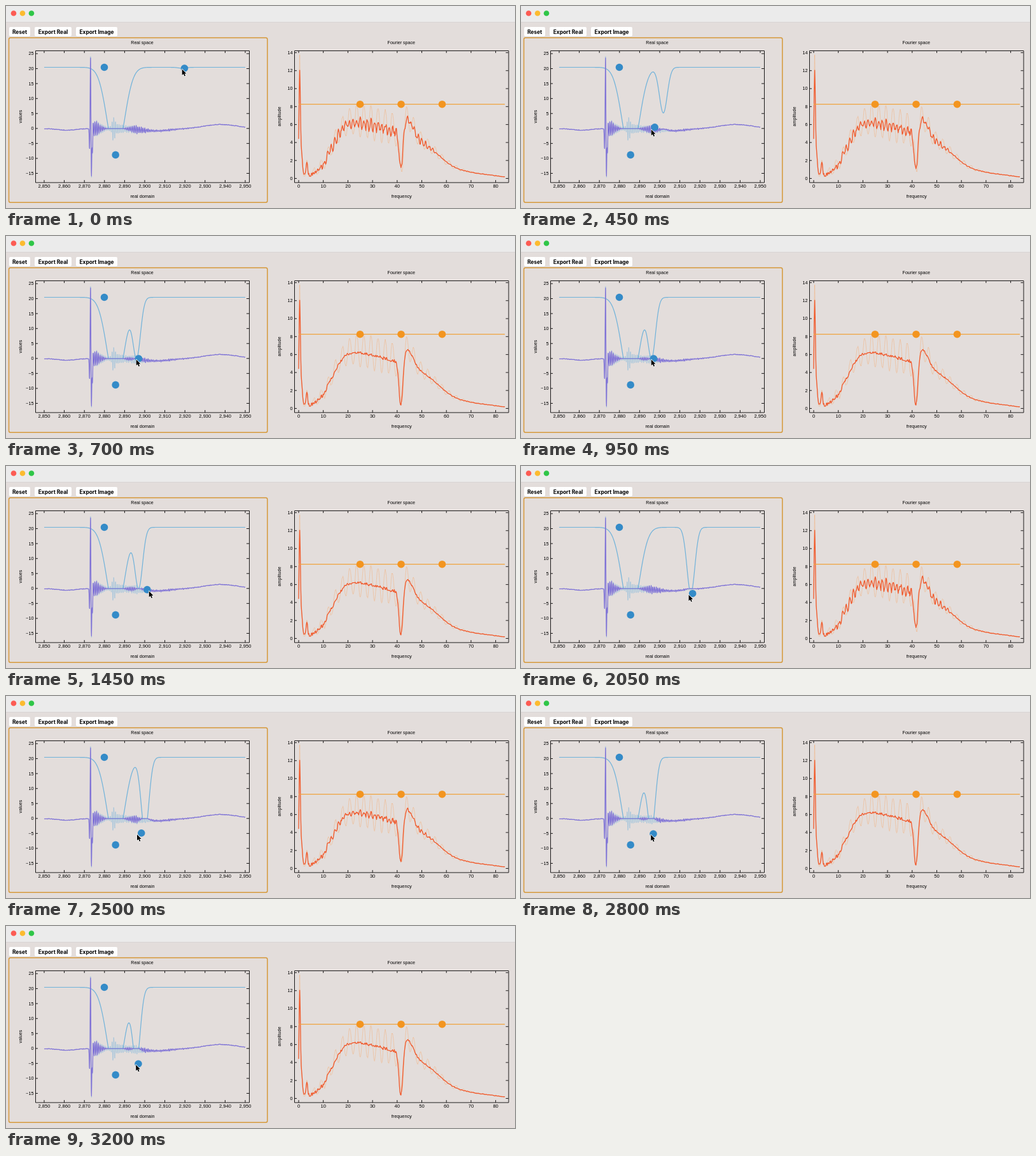
Recreate the animation shown at these times as an HTML page with a canvas. Size 800 px wide and 318 px high, loop 3.25 s.

```html
<!DOCTYPE html>
<html lang="en">
<head>
<meta charset="utf-8">
<title>Fourier filter</title>
<style>
html, body { margin: 0; width: 100%; height: 100%; overflow: hidden; background: #e3dddb; }
canvas { display: block; width: 800px; height: 318px; }
</style>
</head>
<body>
<canvas id="stage"></canvas>
<script>
const LOOP = 3250, STEP = 50;
const TOP = 96.5, ZERO = 193, SPAN = ZERO - TOP, FLOOR = 271;
const BLUE = '#348bc8', ORANGE = '#f39520';
const FILTER_LAG = 80, CURSOR_LEAD = 40;

const canvas = document.getElementById('stage');
const ctx = canvas.getContext('2d');
const ratio = window.devicePixelRatio || 1;
canvas.width = 800 * ratio;
canvas.height = 318 * ratio;
ctx.scale(ratio, ratio);

// The dragged handle: eased moves between resting places.
const origin = { x: 280.5, y: 98 };
const moves = [
  { from: 150, to: 480, x: 208.5, y: 193 },
  { from: 1300, to: 1800, x: 270.5, y: 200.5 },
  { from: 2010, to: 2600, x: 208, y: 217 }
];

const clamp = (v, lo, hi) => Math.min(hi, Math.max(lo, v));
const ease = p => p * p * (3 - 2 * p);
const bell = (x, c, s) => Math.exp(-((x - c) ** 2) / (2 * s * s));
const rise = (x, c, w) => 1 / (1 + Math.exp((c - x) / w));
const noise = n => {
  const v = Math.sin(n * 127.1 + 3.7) * 43758.5453;
  return (v - Math.floor(v)) * 2 - 1;
};

function handleAt(t) {
  let { x, y } = origin;
  for (const m of moves) {
    const p = ease(clamp((t - m.from) / (m.to - m.from), 0, 1));
    x += (m.x - x) * p;
    y += (m.y - y) * p;
  }
  return { x, y };
}

function signal(x) {
  const drift = 2.5 * bell(x, 95, 14) + 3.5 * bell(x, 235, 25) - 6.5 * bell(x, 338, 26);
  const spike = 34 * bell(x, 131.3, 0.45) - 117 * bell(x, 132.8, 0.45)
    + 78 * bell(x, 134.3, 0.45) + 40 * bell(x, 135.8, 0.5);
  const decay = x > 136.6 ? 18 * Math.exp((136.6 - x) / 14) : 0;
  const bursts = x > 136.6
    ? 20 * bell(x, 169.5, 1.8) + 6 * bell(x, 178, 8) + 6 * bell(x, 203, 12) + 1.5 * bell(x, 242, 30)
    : 0;
  const wave = Math.sin(x * 2 * Math.PI / 2.7) * (0.85 + 0.25 * noise(Math.round(x / 1.35)));
  return ZERO + drift + spike + (decay + bursts) * wave + 0.45 * noise(Math.round(x));
}

function gain(x, notch) {
  const first = 1 - 1.43 * bell(x, 172.5, 13.6);
  const second = 1 - (notch.y - TOP) / SPAN * bell(x, notch.x, 6.2);
  return Math.max(0, first) * Math.max(0, second);
}

// Height of the smooth spectrum above its zero line.
function envelope(x, dip) {
  const start = 164 * bell(x, 461.6, 1.1) + 36 * bell(x, 464.6, 1.4) + 22 * bell(x, 473, 1.1);
  const up = rise(x, 514, 11), down = rise(x, 682, 14);
  const hump = up * ((92 - 0.28 * (x - 540)) * (1 - down) + 0.12 * (784 - x) * down);
  return 2 + start + (hump + 24 * bell(x, 632, 8)) * (1 - dip * bell(x, 620.5, 3));
}

function rawSpectrum(x) {
  const comb = Math.cos((x - 540) * 2 * Math.PI / 11.2) + 0.12;
  const amp = 24 * bell(x, 558, 34) + 18 * bell(x, 618, 28) + 5 * bell(x, 680, 30) + 5 * bell(x, 495, 15);
  const rough = 2 * noise(Math.round(x)) * bell(x, 560, 90);
  return Math.min(270.5, FLOOR - envelope(x, 0.93) - 28 * bell(x, 461, 1) - amp * comb + rough);
}

function cleanSpectrum(x, ripple) {
  const amp = 8 * bell(x, 575, 36) + 4 * bell(x, 648, 18) + 4 * bell(x, 518, 14);
  const n = noise(Math.round(x / 1.4));
  const wave = Math.sin((x - 541) * 2 * Math.PI / 5.7) + 0.35 * n;
  const rough = 3 * bell(x, 490, 25) + 2 * bell(x, 590, 50) + 0.4;
  const y = FLOOR - envelope(x, 0.96 - 0.16 * ripple) + ripple * amp * wave + rough * n;
  return Math.min(270.5, y);
}

function plot(fn, from, to, step, color, width, dash = []) {
  ctx.beginPath();
  for (let x = from; x <= to; x += step) ctx.lineTo(x, fn(x));
  ctx.setLineDash(dash);
  ctx.strokeStyle = color;
  ctx.lineWidth = width;
  ctx.lineJoin = 'round';
  ctx.stroke();
  ctx.setLineDash([]);
}

function dot(x, y, r, color) {
  ctx.beginPath();
  ctx.arc(x, y, r, 0, 7);
  ctx.fillStyle = color;
  ctx.fill();
}

function text(str, x, y, size = 7.2, align = 'center', turn = 0) {
  ctx.save();
  ctx.translate(x, y);
  ctx.rotate(turn);
  ctx.font = `${size}px "Liberation Sans", Arial, sans-serif`;
  ctx.textAlign = align;
  ctx.textBaseline = 'middle';
  ctx.fillStyle = '#000';
  ctx.fillText(str, 0, 0);
  ctx.restore();
}

function box(x, y, w, h, color) {
  ctx.beginPath();
  ctx.roundRect(x, y, w, h, 2);
  ctx.fillStyle = color;
  ctx.fill();
}

function button(label, x, w) {
  box(x, 33.6, w, 15.2, '#d2cdcb');
  box(x, 33, w, 15, '#fff');
  ctx.fillStyle = '#000';
  ctx.font = '700 8.4px Inter, Arial, sans-serif';
  ctx.textAlign = 'center';
  ctx.textBaseline = 'middle';
  ctx.fillText(label, x + w / 2, 41.7);
}

function axes({ left, right, xs, ys, title, xName, yName, yNameX }) {
  const mid = (left + right) / 2;
  ctx.strokeStyle = '#1c1a1a';
  ctx.lineWidth = 1;
  ctx.strokeRect(left + 0.5, 70.5, right - left, 207.5);
  ctx.beginPath();
  for (const [x, label] of xs) {
    ctx.moveTo(x, 70); ctx.lineTo(x, 74);
    ctx.moveTo(x, 278); ctx.lineTo(x, 274);
    text(label, x, 283.5, 7.6);
  }
  for (const [y, label] of ys) {
    ctx.moveTo(left, y); ctx.lineTo(left + 4, y);
    ctx.moveTo(right, y); ctx.lineTo(right - 4, y);
    text(label, left - 2.5, y + 0.4, 7.3, 'right');
  }
  ctx.stroke();
  text(title, mid, 57.7, 7.1);
  text(xName, mid + 0.5, 300.3, 7.3);
  text(yName, yNameX, 174, 7.2, 'center', -Math.PI / 2);
}

const ticks = (count, start, gap, label) =>
  Array.from({ length: count }, (_, i) => [start + i * gap, label(i)]);
const signed = n => n < 0 ? '\u2212' + -n : String(n);

const realAxes = {
  left: 46, right: 382, title: 'Real space', xName: 'real domain', yName: 'values', yNameX: 23.5,
  xs: ticks(11, 60, 31.6, i => (2850 + i * 10).toLocaleString('en-US')),
  ys: ticks(9, 75, 23.56, i => signed(25 - i * 5))
};
const fourierAxes = {
  left: 453, right: 789.5, title: 'Fourier space', xName: 'frequency', yName: 'amplitude', yNameX: 430,
  xs: ticks(9, 460, 38.7, i => String(i * 10)),
  ys: ticks(8, 73.5, 28.28, i => String(14 - i * 2))
};

function drawWindow() {
  ctx.fillStyle = '#e3dddb';
  ctx.fillRect(0, 0, 800, 318);
  ctx.fillStyle = '#ebebeb';
  ctx.fillRect(0, 0, 800, 25);
  ctx.fillStyle = '#d9d5d4';
  ctx.fillRect(0, 25, 800, 1);
  ['#fc5b53', '#fcbb30', '#30c648'].forEach((c, i) => dot(12 + i * 14, 11.5, 4.3, c));
  button('Reset', 5, 33);
  button('Export Real', 45, 58);
  button('Export Image', 110, 65);
  ctx.strokeStyle = '#d6993a';
  ctx.lineWidth = 1.5;
  ctx.beginPath();
  ctx.roundRect(4.5, 50, 406.3, 259.3, 2.5);
  ctx.stroke();
  axes(realAxes);
  axes(fourierAxes);
}

function drawCursor(x, y) {
  const arrow = [[0, 0], [0, 9.6], [2.2, 7.6], [3.8, 11], [5.4, 10.3], [3.9, 7], [6.8, 7]];
  ctx.beginPath();
  arrow.forEach(([dx, dy]) => ctx.lineTo(x + dx, y + dy));
  ctx.closePath();
  ctx.lineJoin = 'round';
  ctx.strokeStyle = '#fff';
  ctx.lineWidth = 1.4;
  ctx.stroke();
  ctx.fillStyle = '#000';
  ctx.fill();
}

function draw(t) {
  const handle = handleAt(t);
  const notch = handleAt(t - FILTER_LAG);
  const pointer = handleAt(t + CURSOR_LEAD);
  notch.x -= 3.5;
  const ripple = Math.max(0, 1 - (notch.y - TOP) / SPAN * bell(notch.x, 206, 10));
  drawWindow();

  plot(signal, 60, 376, 0.3, '#9fc3dc', 0.8);
  plot(x => ZERO - SPAN * gain(x, notch), 60, 376, 0.5, '#70b2da', 1.2);
  plot(x => ZERO + (signal(x) - ZERO) * gain(x, notch), 60, 376, 0.3, '#8171d6', 1.2);
  dot(154.5, 96.5, 5.8, BLUE);
  dot(172.2, 234.4, 5.8, BLUE);
  dot(handle.x, handle.y, 5.8, BLUE);

  plot(rawSpectrum, 460, 784, 0.8, '#f3b27e', 0.9, [1.3, 0.9]);
  plot(x => cleanSpectrum(x, ripple), 460, 784, 0.8, '#f0592c', 1.3);
  plot(() => 154.6, 460, 784.5, 324, '#f0a23c', 1.2);
  for (let i = 0; i < 3; i++) dot(556.5 + i * 64.5, 154.7, 5.8, ORANGE);

  drawCursor(pointer.x - 3.8, pointer.y + 1.5);
}

const start = performance.now();
function tick() {
  const t = (performance.now() - start) % LOOP;
  draw(Math.floor(t / STEP) * STEP);
  requestAnimationFrame(tick);
}
tick();
</script>
</body>
</html>
```
